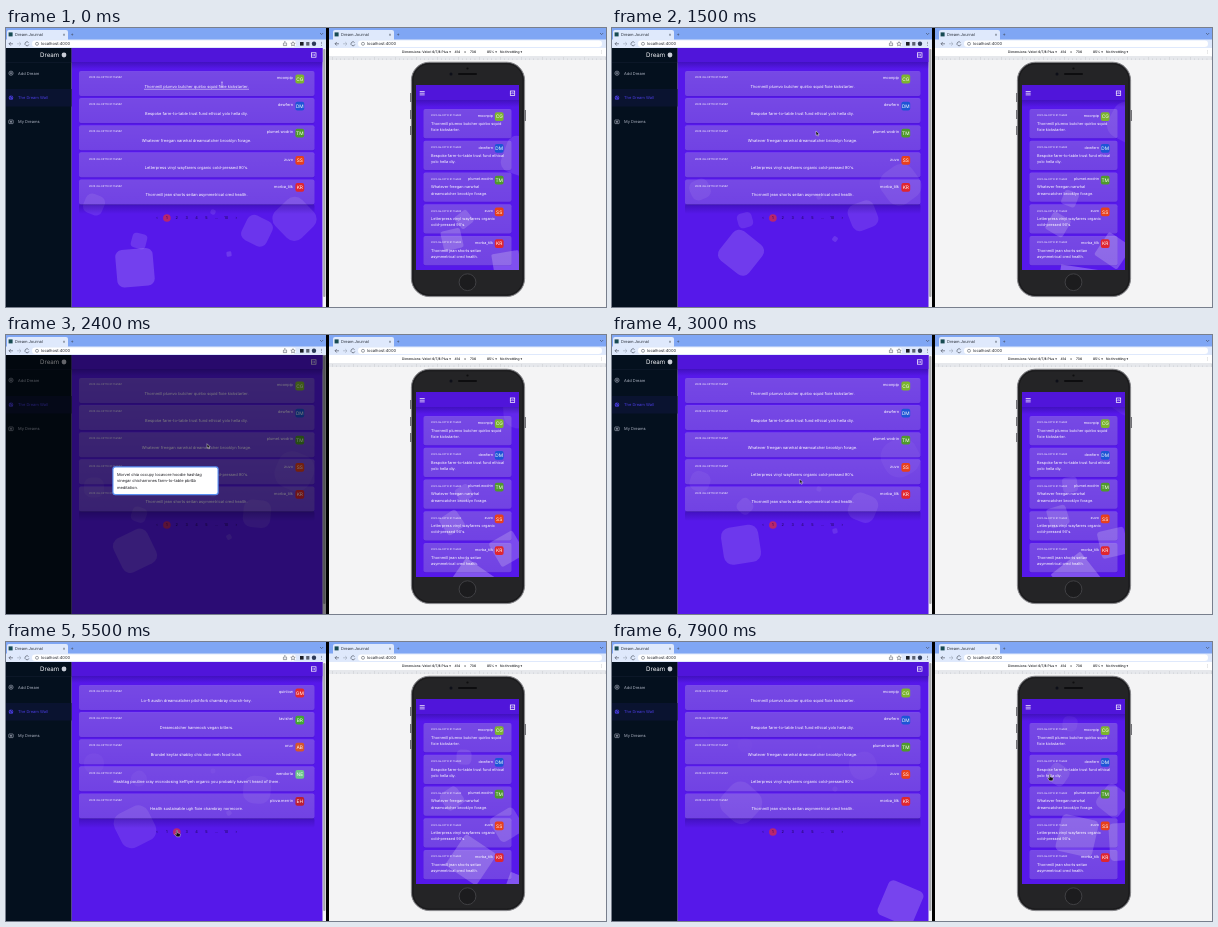
An HTML page for the animation above (8000 ms loop, 600x279 px).

```html
<!DOCTYPE html>
<html lang="en">
<head>
<meta charset="utf-8">
<title>Dream Journal</title>
<style>
html, body { margin: 0; width: 100%; height: 100%; overflow: hidden; background: #000; }
svg { display: block; width: 100vw; height: 100vh; }
text { font-family: Inter, Roboto, sans-serif; text-rendering: geometricPrecision; }
</style>
</head>
<body>
<svg id="stage" viewBox="0 0 600 279">
  <defs>
    <linearGradient id="card" x1="0" y1="0" x2="0" y2="1">
      <stop offset="0" stop-color="#fff" stop-opacity=".22"/>
      <stop offset="1" stop-color="#fff" stop-opacity=".19"/>
    </linearGradient>
    <linearGradient id="shade" x1="0" y1="0" x2="0" y2="1">
      <stop offset="0" stop-color="#1c0470" stop-opacity=".36"/>
      <stop offset="1" stop-color="#1c0470" stop-opacity="0"/>
    </linearGradient>
    <clipPath id="mainClip"><rect x="65.5" y="20" width="251" height="259"/></clipPath>
    <clipPath id="screenClip"><rect x="410" y="57" width="103" height="185"/></clipPath>
  </defs>
</svg>
<script>
const LOOP = 8000;
const stage = document.getElementById('stage');
const PURPLE = '#5618ea';

function add(parent, tag, attrs, content) {
  const el = document.createElementNS('http://www.w3.org/2000/svg', tag);
  for (const key in attrs) el.setAttribute(key, attrs[key]);
  if (content !== undefined) el.textContent = content;
  parent.appendChild(el);
  return el;
}
const group = (parent, attrs = {}) => add(parent, 'g', attrs);
const rect = (parent, x, y, width, height, fill, rx = 0) =>
  add(parent, 'rect', { x, y, width, height, fill, rx });
const dot = (parent, cx, cy, r, fill) => add(parent, 'circle', { cx, cy, r, fill });
const line = (parent, d, stroke, width = .7) =>
  add(parent, 'path', { d, stroke, 'stroke-width': width, fill: 'none' });
const label = (parent, x, y, size, fill, content, anchor = 'start') =>
  add(parent, 'text', { x, y, 'font-size': size, fill, 'text-anchor': anchor }, content);

const firstPage = [
  ['moonpip', 'CG', '#7cb52e', 'Thornmill plumvo butcher quirbo squid fixie kickstarter.', 5],
  ['dewfern', 'DM', '#1d55d6', 'Bespoke farm-to-table trust fund ethical yolo hella diy.', 5],
  ['plumet.wodrin', 'TM', '#4f9a2b', 'Whatever freegan narwhal dreamcatcher brooklyn forage.', 3],
  ['zuvo', 'SS', '#e8401c', 'Letterpress vinyl wayfarers organic cold-pressed 90\'s.', 4],
  ['morba_tilk', 'KR', '#e0262f', 'Thornmill jean shorts seitan asymmetrical cred health.', 4]
];
const secondPage = [
  ['quinlow', 'GM', '#e3282e', 'Lo-fi austin dreamcatcher pitchfork chambray church-key.'],
  ['tavishel', 'BR', '#43a832', 'Dreamcatcher hammock vegan bitters.'],
  ['oruv', 'AB', '#d5562d', 'Brundel keytar shabby chic dovi meh food truck.'],
  ['wendorla', 'NE', '#6cc48a', 'Hashtag poutine cray microdosing keffiyeh organic you probably haven\'t heard of them.'],
  ['plova.merrin', 'EH', '#bd1f35', 'Health sustainable ugh fixie chambray normcore.']
];

const STRIP = '#7fa6f4', TOOLBAR = '#dfe9fc', INK = '#3f4652';

function browserBar(x, width, pillEnd) {
  const g = group(stage, { transform: `translate(${x} 0)` });
  rect(g, -3, 0, width + 3, 20, STRIP);
  rect(g, 1, 2, 61, 12, TOOLBAR, 2);
  rect(g, -3, 11.5, width + 3, 8.5, TOOLBAR);
  rect(g, 26, 12.5, pillEnd - 26, 6.6, '#fff', 3.3);
  rect(g, 2.6, 4.4, 4, 4, '#174a52');
  label(g, 9, 8.1, 4, '#252b35', 'Dream Journal');
  label(g, 56.5, 8.2, 4.5, INK, '×');
  label(g, 64.5, 8.3, 5, INK, '+');
  line(g, 'M7 15.8H3M4.8 14 3 15.8l1.8 1.8', INK, .6);
  line(g, 'M11 15.8h4M13.2 14l1.8 1.8-1.8 1.8', '#9aa4b5', .6);
  line(g, 'M22.6 14.6a2 2 0 1 0 .3 1.8', INK, .6);
  add(g, 'circle', { cx: 31, cy: 15.8, r: 1.5, fill: 'none', stroke: INK, 'stroke-width': .5 });
  label(g, 35, 17.3, 4.1, '#20242c', 'localhost:4000');
  line(g, `M${width - 6} 5l1.6 1.6L${width - 2.8} 5`, INK, .6);
  return g;
}

const left = group(stage);
rect(left, 0, 0, 320, 279, '#f1f1f4');
rect(left, 317.2, 21, 2.2, 248, '#a2a3a9', 1);
const main = group(left, { 'clip-path': 'url(#mainClip)' });
rect(main, 65, 20, 252, 259, PURPLE);
const mainShapes = group(main);
rect(main, 73, 176, 235.5, 10, 'url(#shade)', 2);

function avatar(parent, x, y, fill, initials) {
  rect(parent, x - 4.4, y - 4.4, 8.8, 8.8, fill, 2);
  label(parent, x, y + 1.7, 4.8, '#fff', initials, 'middle');
}
const DATE = '2022-06-02T10:31:11.653Z';

function wideCards(dreams) {
  const g = group(main);
  dreams.forEach(([author, initials, colour, title], i) => {
    const y = 43 + i * 27.1;
    rect(g, 73, y + .6, 235.5, 25.3, 'rgba(30,0,110,.1)', 2);
    rect(g, 73, y, 235.5, 25, 'url(#card)', 2);
    label(g, 83, y + 7.2, 2.6, '#fff', DATE);
    label(g, 287, y + 8.2, 3.9, '#fff', author, 'end');
    avatar(g, 293.8, y + 8, colour, initials);
    label(g, 190.5, y + 17, 4, '#fff', title, 'middle');
  });
  return g;
}
const pages = [wideCards(firstPage), wideCards(secondPage)];
const underline = rect(main, 138, 60.9, 105, .45, '#fff');

rect(main, 65, 34, 252, 7, 'url(#shade)');
rect(main, 65, 20, 252, 14, '#5015da');

function exitIcon(parent, x, y) {
  add(parent, 'rect', { x: x - 2.2, y: y - 2.2, width: 4.4, height: 4.4, fill: 'none', stroke: '#fff', 'stroke-width': .7 });
  line(parent, `M${x - 2.6} ${y}h3.6M${x} ${y - 1}l1 1-1 1`, '#fff', .5);
}
exitIcon(main, 307.8, 27);

const selected = dot(main, 160.5, 190, 3.8, '#b8266e');
['‹', '1', '2', '3', '4', '5', '…', '10', '›'].forEach((item, i) =>
  label(main, 151 + i * 9.9, 191.4, 3.9, '#1b0650', item, 'middle'));

rect(left, 0, 20, 65.5, 259, '#04101e');
rect(left, 0, 61, 65.5, 17.5, '#0a1330');
label(left, 34, 29.2, 6.2, '#f2f3f7', 'Dream');
dot(left, 58, 27, 2.4, '#c8ccd6');
rect(left, 0, 34.2, 65.5, .4, '#1a2237');
const MUTED = '#aeb4c3', ACTIVE = '#4a3ce0';
add(left, 'circle', { cx: 5, cy: 45.2, r: 2.1, fill: 'none', stroke: MUTED, 'stroke-width': .6 });
line(left, 'M3.8 45.2h2.4M5 44v2.4', MUTED, .6);
dot(left, 5, 69.7, 2.3, ACTIVE);
line(left, 'M3.2 69l1.5.8.3 2M5 67.6l.5 1.3 1.5.4', '#0b1336', .6);
add(left, 'rect', { x: 2.8, y: 92, width: 4.4, height: 3.6, rx: .5, fill: 'none', stroke: MUTED, 'stroke-width': .6 });
dot(left, 5, 93.8, .9, MUTED);
[['Add Dream', 46.7, MUTED], ['The Dream Wall', 71.2, ACTIVE], ['My Dreams', 95.3, MUTED]]
  .forEach(([name, y, fill]) => label(left, 12, y, 4, fill, name));

const barIcons = browserBar(0, 320, 290);
line(barIcons, 'M278 15.2h-.6v2.4h3.2v-2.4H280M279 16.4v-2.8M278.2 14.3l.8-.8.8.8', INK, .5);
line(barIcons, 'M287 13.7l.7 1.4 1.5.2-1.1 1 .3 1.5-1.4-.7-1.4.7.3-1.5-1.1-1 1.5-.2Z', INK, .5);
rect(barIcons, 294, 14, 3.6, 3.6, '#1c1f26');
rect(barIcons, 300.2, 14, 3.2, 3.6, '#5a6170');
dot(barIcons, 308, 15.8, 2.2, '#2c3a58');
[14.2, 15.8, 17.4].forEach(y => dot(barIcons, 315.5, y, .45, INK));

const overlay = rect(left, 0, 20, 320, 259, '#000');

function dialog(lines, y, height) {
  const g = group(left);
  rect(g, 106.3, y - 1.2, 106.4, height + 2.4, '#5a8ff0', 3);
  rect(g, 107.5, y, 104, height, '#fff', 2);
  lines.forEach((content, i) => label(g, 111, y + 8.2 + i * 6.5, 4, '#16161c', content));
  return g;
}
const dialogs = [
  { from: 880, to: 1280, el: dialog([
    'Deep v chambray offal freegan williamsburg',
    'sriracha shabby chic waistcoat twee.'], 136, 20) },
  { from: 1980, to: 2500, el: dialog([
    'Morvel chia occupy locavore hoodie hashtag',
    'vinegar chicharrones farm-to-table pbr&b',
    'meditation.'], 132.5, 26.5) }
];

// Phone preview
rect(stage, 323, 0, 277, 279, '#f4f4f5');
browserBar(326, 274, 270);
rect(stage, 323, 20, 277, 8, '#fff');
const deviceBar = group(stage, { 'font-weight': 500 });
[['Dimensions: Velori 6/7/8 Plus ▾', 396], ['414', 448.5], ['×', 458], ['736', 464], ['85% ▾', 481], ['No throttling ▾', 494], ['⋮', 594]]
  .forEach(([content, x]) => label(deviceBar, x, 25.2, 3.3, '#15171b', content));
rect(stage, 323, 28, 277, 4, '#e6e8ec');
for (let x = 326, i = 0; x < 600; x += 4.2, i++)
  rect(stage, x, i % 5 ? 30.4 : 29, .35, i % 5 ? 1.6 : 3, '#b9bcc3');

add(stage, 'rect', { x: 405.4, y: 34.2, width: 113.2, height: 234.4, rx: 18, fill: '#2a2a2d', stroke: '#88888c', 'stroke-width': 1 });
add(stage, 'rect', { x: 407, y: 35.8, width: 110, height: 231.2, rx: 16.5, fill: '#242426', stroke: '#161617', 'stroke-width': .8 });
[65, 82, 98].forEach(y => rect(stage, 404.2, y, 1, 9, '#55555a'));
rect(stage, 518.8, 82, 1, 11, '#55555a');
dot(stage, 461.5, 40.5, 1.1, '#0e0e10');
dot(stage, 445, 46, 1.5, '#0d0f18');
rect(stage, 452, 45, 19, 2, '#0d0d0f', 1);
add(stage, 'circle', { cx: 461.5, cy: 254.2, r: 8.4, fill: '#1c1c1e', stroke: '#454548', 'stroke-width': .9 });

const screen = group(stage, { 'clip-path': 'url(#screenClip)' });
rect(screen, 410, 57, 103, 185, PURPLE);
const screenShapes = group(screen);
firstPage.forEach(([author, initials, colour, title, breakAt], i) => {
  const y = 81 + i * 31.75;
  const words = title.split(' ');
  rect(screen, 417.5, y + .6, 88, 29.4, 'rgba(30,0,110,.1)', 2);
  rect(screen, 417.5, y, 88, 29.2, 'url(#card)', 2);
  label(screen, 425, y + 7.4, 2.4, '#fff', DATE);
  label(screen, 487, y + 7.8, 3.7, '#fff', author, 'end');
  avatar(screen, 493.2, y + 7.6, colour, initials);
  label(screen, 425, y + 15.9, 3.85, '#fff', words.slice(0, breakAt).join(' '));
  label(screen, 425, y + 22.2, 3.85, '#fff', words.slice(breakAt).join(' '));
});
rect(screen, 410, 72, 103, 7, 'url(#shade)');
rect(screen, 410, 57, 103, 15, '#5015da');
line(screen, 'M413.7 63.5h5M413.7 65.2h5M413.7 66.9h5', '#fff', .7);
exitIcon(screen, 506.5, 65.2);

// Squares that rise, turn, round off and fade
const TRAVEL = 250;
function riser(layer, x, size, floor, duration, start) {
  const el = add(layer, 'rect', { x: -size / 2, y: -size / 2, width: size, height: size, fill: '#fff' });
  const base = floor + 37.5 - size / 2;
  return t => {
    const age = t - start;
    const p = ((age % duration) + duration) % duration / duration;
    el.setAttribute('transform', `translate(${x} ${base - TRAVEL * p}) rotate(${720 * p})`);
    el.setAttribute('rx', size / 2 * p);
    el.setAttribute('opacity', .27 * (1 - p));
  };
}
const FLOOR = 313, PHONE_FLOOR = 242;
const risers = [
  riser(mainShapes, 129, 37.5, FLOOR, 25000, -9200),
  riser(mainShapes, 251, 27.5, FLOOR, 25000, -13400),
  riser(mainShapes, 288.5, 37.5, FLOOR, 11000, 4800),
  riser(mainShapes, 88, 20, FLOOR, 25000, -16400),
  riser(mainShapes, 133, 15, FLOOR, 18000, -9360),
  riser(mainShapes, 207, 5, FLOOR, 25000, -16400),
  riser(mainShapes, 223, 5, FLOOR, 25000, -12200),
  riser(screenShapes, 465, 37.5, PHONE_FLOOR, 25000, 1200),
  riser(screenShapes, 501, 27.5, PHONE_FLOOR, 25000, -2800),
  riser(screenShapes, 516, 37.5, PHONE_FLOOR, 11000, -5800),
  riser(screenShapes, 446, 20, PHONE_FLOOR, 25000, -5800),
  riser(screenShapes, 458, 15, PHONE_FLOOR, 18000, -5800)
];

const pointer = group(stage);
const outline = { fill: '#111', stroke: '#fff', 'stroke-width': .4, 'stroke-linejoin': 'round' };
const arrow = add(pointer, 'path', { d: 'M0-2V2.5l1.1-.9.7 1.6.8-.3-.7-1.6h1.4Z', ...outline });
const hand = add(pointer, 'path', { d: 'M-.8-2.4q.6-.7 1.2 0V0l2.4.6q.5.2.4.9l-.5 2.3h-3.2l-1.8-2.4q.1-.8.9-.4l.6.5Z', ...outline });
const beam = line(pointer, 'M-1-2.6q1 0 1 .6v4q0 .6 1 .6M1-2.6q-1 0-1 .6M0 2q0 .6-1 .6', '#f4f0ff', .5);
const route = [
  [0, 216, 56.5], [350, 215, 61], [850, 206, 86], [1250, 206, 88], [1500, 204, 105], [1900, 201, 110],
  [2700, 201, 111], [3350, 171, 190], [3700, 172, 191], [4000, 179, 192], [4500, 180, 191], [5200, 172, 191],
  [5600, 171, 191], [5900, 161, 191], [6300, 162, 190], [7000, 300, 155], [7500, 430, 135], [7900, 438, 135], [8000, 438, 135]
];
const ease = u => u * u * (3 - 2 * u);

function pointerAt(t) {
  const i = route.findIndex(stop => stop[0] > t);
  const [t0, x0, y0] = route[i - 1], [t1, x1, y1] = route[i];
  const u = ease((t - t0) / (t1 - t0));
  return [x0 + (x1 - x0) * u, y0 + (y1 - y0) * u];
}
const clamp = v => Math.max(0, Math.min(1, v));
const show = (el, on) => el.setAttribute('visibility', on ? 'visible' : 'hidden');

function draw(t) {
  risers.forEach(update => update(t));

  let dim = 0;
  dialogs.forEach(({ from, to, el }) => {
    const amount = Math.min(clamp((t - from) / 140), clamp((to + 180 - t) / 180));
    el.setAttribute('opacity', amount);
    dim = Math.max(dim, amount);
  });
  overlay.setAttribute('opacity', dim * .5);

  const second = t >= 3500 && t < 6000;
  show(pages[0], !second);
  show(pages[1], second);
  selected.setAttribute('cx', second ? 170.8 : 160.9);

  const [x, y] = pointerAt(t);
  pointer.setAttribute('transform', `translate(${x} ${y})`);
  const onTitle = y < 63;
  const pointing = y > 186 || x > 410;
  show(underline, onTitle);
  show(beam, onTitle);
  show(hand, pointing);
  show(arrow, !pointing && !onTitle);
}

const begin = performance.now();
function frame() {
  draw((performance.now() - begin) % LOOP);
  requestAnimationFrame(frame);
}
draw(0);
requestAnimationFrame(frame);
</script>
</body>
</html>
```
